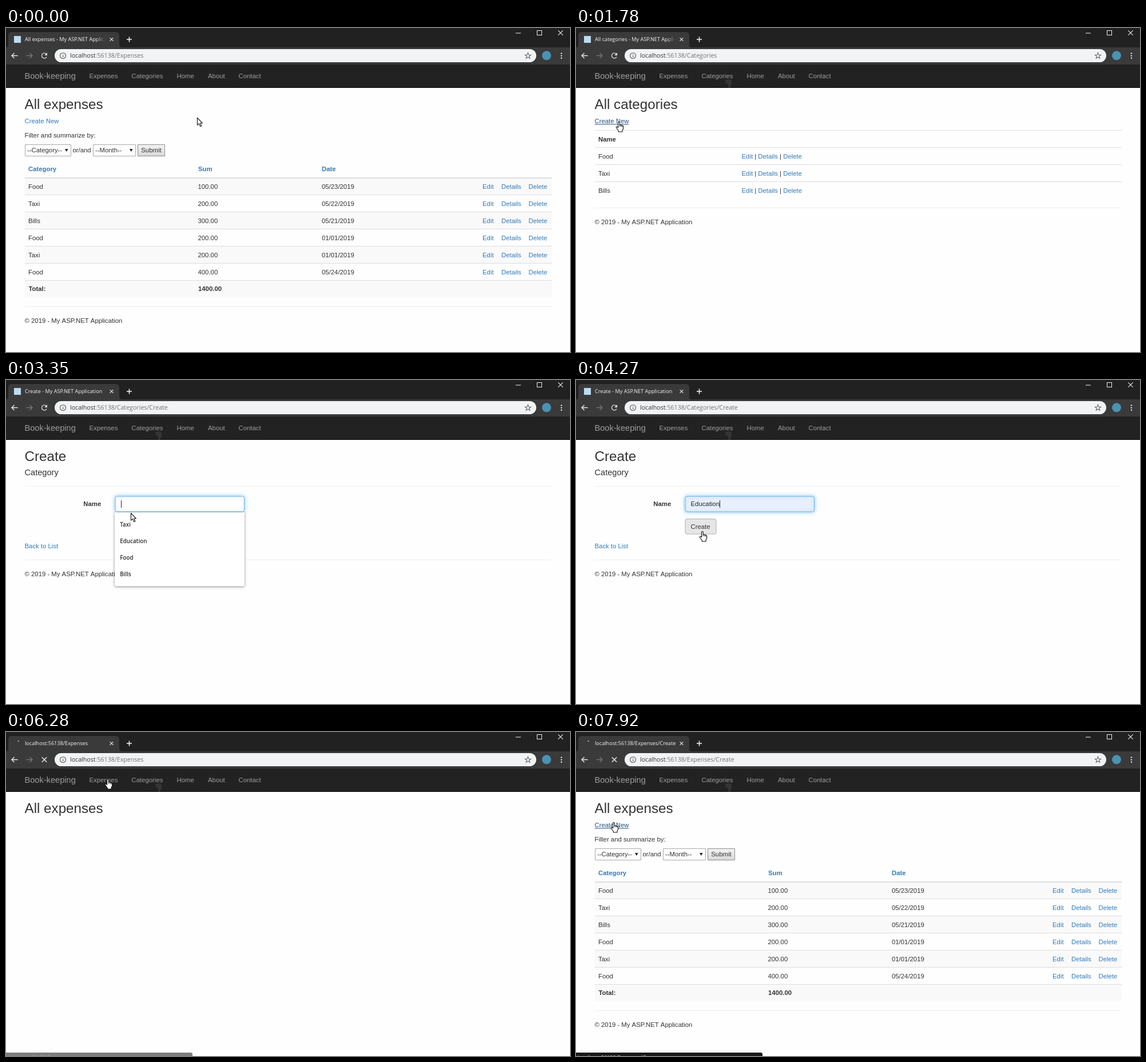
Animation of 986 by 568 pixels, one loop 8000 ms. Source, as an HTML page with a canvas:

```html
<!DOCTYPE html>
<html lang="en">
<head>
<meta charset="utf-8">
<title>Book-keeping</title>
<style>
html, body { margin: 0; width: 100%; height: 100%; overflow: hidden; background: #fefefe; }
canvas { display: block; width: 986px; height: 568px; }
</style>
</head>
<body>
<canvas id="stage" width="986" height="568"></canvas>
<script>
const g = document.getElementById('stage').getContext('2d');
const LOOP = 8000, STEP = 77.5;
const SANS = '"Liberation Sans", Arial, sans-serif';
const UI = '"Open Sans", "Noto Sans", sans-serif';
const BODY = '11.35px ' + SANS, BOLD = 'bold ' + BODY;
const INK = '#333', LINK = '#337ab7';
const HOST = 'localhost', PORT = ':56138/', APP = ' - My ASP.NET Application';

// time, page, tab title (empty while loading), path
const states = [
  [0, 'expenses', 'All expenses', 'Expenses'],
  [790, 'expenses', '', 'Categories'],
  [945, 'catTitle', '', 'Categories'],
  [1020, 'categories', 'All categories', 'Categories'],
  [1950, 'categories', '', 'Categories/Create'],
  [2180, 'create', 'Create', 'Categories/Create'],
  [4660, 'create', '', 'Categories/Create'],
  [4735, 'catTitle', '', 'Categories'],
  [4810, 'categories4', 'All categories', 'Categories'],
  [6130, 'categories4', '', 'Expenses'],
  [6205, 'expTitle', '', 'Expenses'],
  [6360, 'expenses', 'All expenses', 'Expenses'],
  [7920, 'expenses', '', 'Expenses/Create']
];

// cursor: time, x, y of the tip
const path = [
  [0, 334, 157], [610, 266, 87], [940, 266, 87], [1540, 107, 160], [1770, 75, 164],
  [2200, 75, 164], [2704, 186, 212], [3030, 225, 218], [3250, 222, 222], [3320, 218, 233],
  [3557, 225, 267], [3634, 225, 270], [4180, 225, 270], [4254, 221, 265], [4409, 219, 258],
  [5280, 219, 258], [6036, 178, 82], [6430, 178, 82], [6892, 92, 137], [7277, 65, 154],
  [7440, 65, 154], [7509, 66, 158], [8000, 66, 158]
];
const hands = [[540, 1000], [1620, 2190], [4260, 5285], [5950, 6480], [7500, 8000]];
const beams = [[2730, 3265]];

// status bubble: start, fade-in end, end, path
const bubbles = [
  [790, 1040, 1180, 'Categories'],
  [1950, 2100, 2330, 'Categories/Create'],
  [6100, 6460, 6600, 'Expenses'],
  [7510, 7750, 8001, 'Expenses/Create']
];

const within = (t, spans) => spans.some(s => t >= s[0] && t < s[1]);

function rect(x, y, w, h, fill) { g.fillStyle = fill; g.fillRect(x, y, w, h); }

function box(x, y, w, h, r, fill, line) {
  g.beginPath();
  g.roundRect(x, y, w, h, r);
  if (fill) { g.fillStyle = fill; g.fill(); }
  if (line) { g.strokeStyle = line; g.lineWidth = 1; g.stroke(); }
}

function text(s, x, y, color = INK, font = BODY) {
  g.font = font;
  g.fillStyle = color;
  g.fillText(s, x, y);
  return x + g.measureText(s).width;
}

function poly(pts, color, width = 1.3, close) {
  g.beginPath();
  for (let i = 0; i < pts.length; i += 2) g.lineTo(pts[i], pts[i + 1]);
  if (close) g.closePath();
  g.strokeStyle = color;
  g.lineWidth = width;
  g.stroke();
}

function ring(x, y, r, color, a = 0, b = 7) {
  g.beginPath();
  g.arc(x, y, r, a, b);
  g.strokeStyle = color;
  g.lineWidth = 1.2;
  g.stroke();
}

function dot(x, y, r, color) {
  g.beginPath();
  g.arc(x, y, r, 0, 7);
  g.fillStyle = color;
  g.fill();
}

function cross(x, y, r, color, w) {
  poly([x - r, y - r, x + r, y + r], color, w);
  poly([x - r, y + r, x + r, y - r], color, w);
}

function drawTab(title, url) {
  g.beginPath();
  g.moveTo(0, 34);
  g.quadraticCurveTo(4, 34, 4, 29);
  g.lineTo(4, 13);
  g.quadraticCurveTo(4, 7, 10, 7);
  g.lineTo(192, 7);
  g.quadraticCurveTo(198, 7, 198, 13);
  g.lineTo(198, 29);
  g.quadraticCurveTo(198, 34, 202, 34);
  g.fillStyle = '#3a3a3a';
  g.fill();
  if (title) box(14, 14, 12, 12, 0, '#b9dcee');
  else dot(21.5, 16, 1, '#ddd');
  const label = title ? title + APP : HOST + PORT + url;
  let color = '#f4f4f4';
  if (title && title !== 'Create') {
    color = g.createLinearGradient(158, 0, 174, 0);
    color.addColorStop(0, '#f4f4f4');
    color.addColorStop(1, '#3a3a3a');
  }
  g.save();
  g.beginPath();
  g.rect(30, 8, 146, 24);
  g.clip();
  text(label, 33, 23.3, color, '9.15px ' + UI);
  g.restore();
  cross(184.5, 20, 2.9, '#e4e4e4', 1.2);
}

function drawChrome(title, url) {
  rect(0, 0, 986, 34, '#212121');
  rect(0, 34, 986, 30, '#3a3a3a');
  drawTab(title, url);
  rect(211, 19.2, 9, 1.6, '#eee');
  rect(214.7, 15.5, 1.6, 9, '#eee');
  rect(891, 8.5, 9, 1, '#eee');
  g.strokeStyle = '#eee';
  g.lineWidth = 1;
  g.strokeRect(928.5, 4.5, 8, 8);
  cross(969.5, 8.5, 4.2, '#eee', 1.1);

  poly([14.5, 44, 10, 48.5, 14.5, 53], '#e8e8e8', 1.5);
  poly([10, 48.5, 20.5, 48.5], '#e8e8e8', 1.5);
  poly([41.5, 44, 46, 48.5, 41.5, 53], '#777', 1.4);
  poly([35.5, 48.5, 46, 48.5], '#777', 1.4);
  if (title) {
    ring(67, 48.5, 4.5, '#e8e8e8', 0.5, 5.6);
    g.beginPath();
    g.moveTo(72, 43.3); g.lineTo(72, 48); g.lineTo(67.3, 48);
    g.fillStyle = '#e8e8e8';
    g.fill();
  } else cross(67, 48.5, 4.2, '#e8e8e8', 1.5);

  box(85, 37, 842, 23, 11.5, '#f1f3f4');
  ring(99.5, 48.5, 5, '#5f6368');
  rect(99, 47.7, 1.2, 3.6, '#5f6368');
  rect(99, 45.5, 1.2, 1.2, '#5f6368');
  const x = text(HOST, 112, 52.3, '#303336', '10.65px ' + UI);
  text(PORT + url, x, 52.3, '#6f7377', '10.65px ' + UI);

  const star = [];
  for (let i = 0; i < 10; i++) {
    const a = i * Math.PI / 5 - Math.PI / 2, r = i % 2 ? 2.3 : 5.4;
    star.push(912.5 + r * Math.cos(a), 48.8 + r * Math.sin(a));
  }
  poly(star, '#5f6368', 1.1, true);
  dot(945, 48.3, 8, '#4a93b4');
  for (const y of [44.4, 48.6, 52.8]) dot(971, y, 1.2, '#e8e8e8');
}

function drawNav(t) {
  rect(0, 64, 986, 40, '#222');
  rect(0, 104, 986, 1, '#080808');
  text('Book-keeping', 32.5, 89, '#9d9d9d', '14.6px ' + SANS);
  const hot = within(t, [[540, 945]]) ? 'Categories' : within(t, [[5950, 6205]]) ? 'Expenses' : '';
  const items = { Expenses: 145.5, Categories: 219.5, Home: 298.5, About: 353, Contact: 406.5 };
  for (const k in items) text(k, items[k], 88, k === hot ? '#fff' : '#9d9d9d');
  // faint trace left behind by the pointer
  if (t > 1020) {
    g.beginPath();
    g.moveTo(261, 91); g.lineTo(272, 90); g.lineTo(272, 99);
    g.lineTo(269, 105); g.lineTo(266, 104); g.lineTo(266, 99); g.lineTo(261, 96);
    g.fillStyle = '#343434';
    g.fill();
  }
}

const heading = s => text(s, 32.5, 142, INK, '24.2px ' + SANS);
const rule = (y, color = '#ddd', h = 1) => rect(33, y, 921, h, color);

function createLink(t) {
  const hot = within(t, [[1690, 2180], [7510, 8000]]);
  const end = text('Create New', 32.5, 167, hot ? '#23527c' : LINK);
  if (hot) rect(33, 168.4, end - 33, 1, '#23527c');
}

function footer(y) {
  rule(y, '#eee');
  text('\u00a9 2019' + APP, 32.5, y + 29);
}

function select(label, x, w) {
  box(x + .5, 204.5, w, 20, 0, '#fff', '#a9a9a9');
  text(label, x + 4, 218);
  g.beginPath();
  g.moveTo(x + w - 10, 212); g.lineTo(x + w - 4.4, 212); g.lineTo(x + w - 7.2, 217);
  g.fillStyle = '#222';
  g.fill();
}

function expenses(t) {
  heading('All expenses');
  createLink(t);
  text('Filter and summarize by:', 32.5, 191.5);
  select('--Category--', 33, 80);
  text('or/and', 116.5, 218);
  select('--Month--', 152, 74);
  const shade = g.createLinearGradient(0, 204, 0, 225);
  shade.addColorStop(0, '#f4f4f4');
  shade.addColorStop(1, '#d8d8d8');
  box(230.5, 204.5, 47, 20, 0, shade, '#8c8c8c');
  text('Submit', 236.3, 218);

  text('Category', 39, 251, LINK, BOLD);
  text('Sum', 336, 251, LINK, BOLD);
  text('Date', 552, 251, LINK, BOLD);
  const rows = [
    ['Food', '100.00', '05/23/2019'], ['Taxi', '200.00', '05/22/2019'],
    ['Bills', '300.00', '05/21/2019'], ['Food', '200.00', '01/01/2019'],
    ['Taxi', '200.00', '01/01/2019'], ['Food', '400.00', '05/24/2019']
  ];
  for (let i = 0; i < 7; i += 2) rule(263 + i * 29.9, '#f9f9f9', 29.5);
  rule(262, '#ddd', 2);
  rows.forEach((r, i) => {
    const y = Math.round(282 + i * 29.9);
    rule(y + 10, '#ddd');
    text(r[0], 39, y);
    text(r[1], 335.5, y);
    text(r[2], 552, y);
    text('Edit', 833, y, LINK);
    text('Details', 866, y, LINK);
    text('Delete', 913.5, y, LINK);
  });
  text('Total:', 39.5, 461, INK, BOLD);
  text('1400.00', 336, 461, INK, BOLD);
  footer(488);
}

function categories(t, names, x0) {
  heading('All categories');
  createLink(t);
  rule(179);
  text('Name', 39, 199, INK, BOLD);
  names.forEach((name, i) => {
    const y = Math.round(229 + i * 29.9);
    rule(y - 20);
    text(name, 39, y);
    let x = x0;
    ['Edit', 'Details', 'Delete'].forEach((s, j) => {
      if (j) x = text(' | ', x, y);
      x = text(s, x, y, LINK);
    });
  });
  footer(225 + names.length * 30);
}

function create(t) {
  heading('Create');
  text('Category', 32.5, 167, INK, '14.6px ' + SANS);
  rule(186, '#eee');
  text('Name', 135.3, 221, INK, BOLD);

  const focus = t >= 3110, filled = t >= 3890;
  g.save();
  if (focus) { g.shadowColor = 'rgba(102,175,233,.7)'; g.shadowBlur = 7; }
  box(191, 204, 225.5, 27, 3, filled ? '#e8f0fe' : '#fff', focus ? '#66afe9' : '#ccc');
  g.restore();
  const end = filled ? text('Education', 200.5, 221, '#222') : 201;
  if (focus && t < 4420) rect(Math.round(end), 211, 1, 13, '#222');

  const hot = t >= 4260, down = t >= 4420;
  box(191, 243.5, 54, 26.5, 3, down ? '#d4d4d4' : hot ? '#e6e6e6' : '#fff',
    down ? '#8c8c8c' : hot ? '#adadad' : '#ccc');
  text('Create', 200.5, 261);
  text('Back to List', 32.5, 295, LINK);
  footer(315);

  if (t >= 3190 && !filled) {
    g.save();
    g.shadowColor = 'rgba(0,0,0,.45)';
    g.shadowBlur = 4;
    g.shadowOffsetY = 1;
    box(190, 232, 227, 129.5, 2, '#fff');
    g.restore();
    const row = t >= 3500 ? 1 : t >= 3400 ? 0 : -1;
    if (row >= 0) rect(190, 239 + row * 29, 227, 29, '#ececec');
    ['Taxi', 'Education', 'Food', 'Bills'].forEach((s, i) =>
      text(s, 199.3, 256.7 + i * 29, '#2b2b2b', '600 9.8px ' + UI));
  }
}

const pages = {
  expenses,
  create,
  expTitle: () => heading('All expenses'),
  catTitle: () => heading('All categories'),
  categories: t => categories(t, ['Food', 'Taxi', 'Bills'], 289.5),
  categories4: t => categories(t, ['Food', 'Taxi', 'Bills', 'Education'], 360.5)
};

function drawBubble(t) {
  const b = bubbles.find(s => t >= s[0] && t < s[2]);
  if (!b) return;
  g.save();
  g.globalAlpha = Math.min(1, (t - b[0] + 20) / (b[1] - b[0]));
  box(-4, 562, 330, 12, 3, '#1a1a1a');
  text(HOST + PORT + b[3], 3, 574, '#ddd', '9.15px ' + UI);
  g.restore();
}

const arrow = new Path2D('M.5 .5V13.2L3.5 10.6L5.7 15.6L7.8 14.7L5.7 9.8H9.5Z');
const hand = new Path2D('M-1.4 1.3Q0 -.4 1.3 1.3V6.2Q2.8 5 3.9 6.7Q5.2 5.8 6.1 7.5Q7.7 7 7.7 9V12.4L6 15.6V18H-.6V16.2L-4.6 10.7Q-4.8 8.6 -2.8 9.2L-1.4 10.6Z');

function drawCursor(t) {
  const q = Math.max(0, Math.floor((t + 8) / STEP) * STEP - 8);
  const i = Math.max(1, path.findIndex(p => p[0] >= q));
  const a = path[i - 1], b = path[i];
  let u = (q - a[0]) / (b[0] - a[0]);
  u = u * u * (3 - 2 * u);
  const x = a[1] + (b[1] - a[1]) * u, y = a[2] + (b[2] - a[2]) * u;
  g.save();
  g.translate(Math.round(x), Math.round(y));
  if (within(t, beams)) {
    poly([-2.5, -7, 2.5, -7], '#222', 1);
    poly([0, -7, 0, 7], '#222', 1);
    poly([-2.5, 7, 2.5, 7], '#222', 1);
  } else {
    const shape = within(t, hands) ? hand : arrow;
    g.lineJoin = 'round';
    g.lineWidth = 1.1;
    g.fillStyle = '#fff';
    g.strokeStyle = '#111';
    g.fill(shape);
    g.stroke(shape);
    if (shape === hand) {
      poly([1.3, 6.2, 1.3, 9], '#111', .9);
      poly([3.9, 6.7, 3.9, 9.3], '#111', .9);
      poly([6.1, 7.5, 6.1, 9.6], '#111', .9);
    }
  }
  g.restore();
}

function draw(t) {
  const [, page, title, url] = states.filter(s => s[0] <= t).pop();
  rect(0, 0, 986, 568, '#fefefe');
  pages[page](t);
  drawChrome(title, url);
  drawNav(t);
  drawBubble(t);
  drawCursor(t);
}

const start = performance.now();
function tick() {
  draw((performance.now() - start) % LOOP);
  requestAnimationFrame(tick);
}
tick();
</script>
</body>
</html>
```
